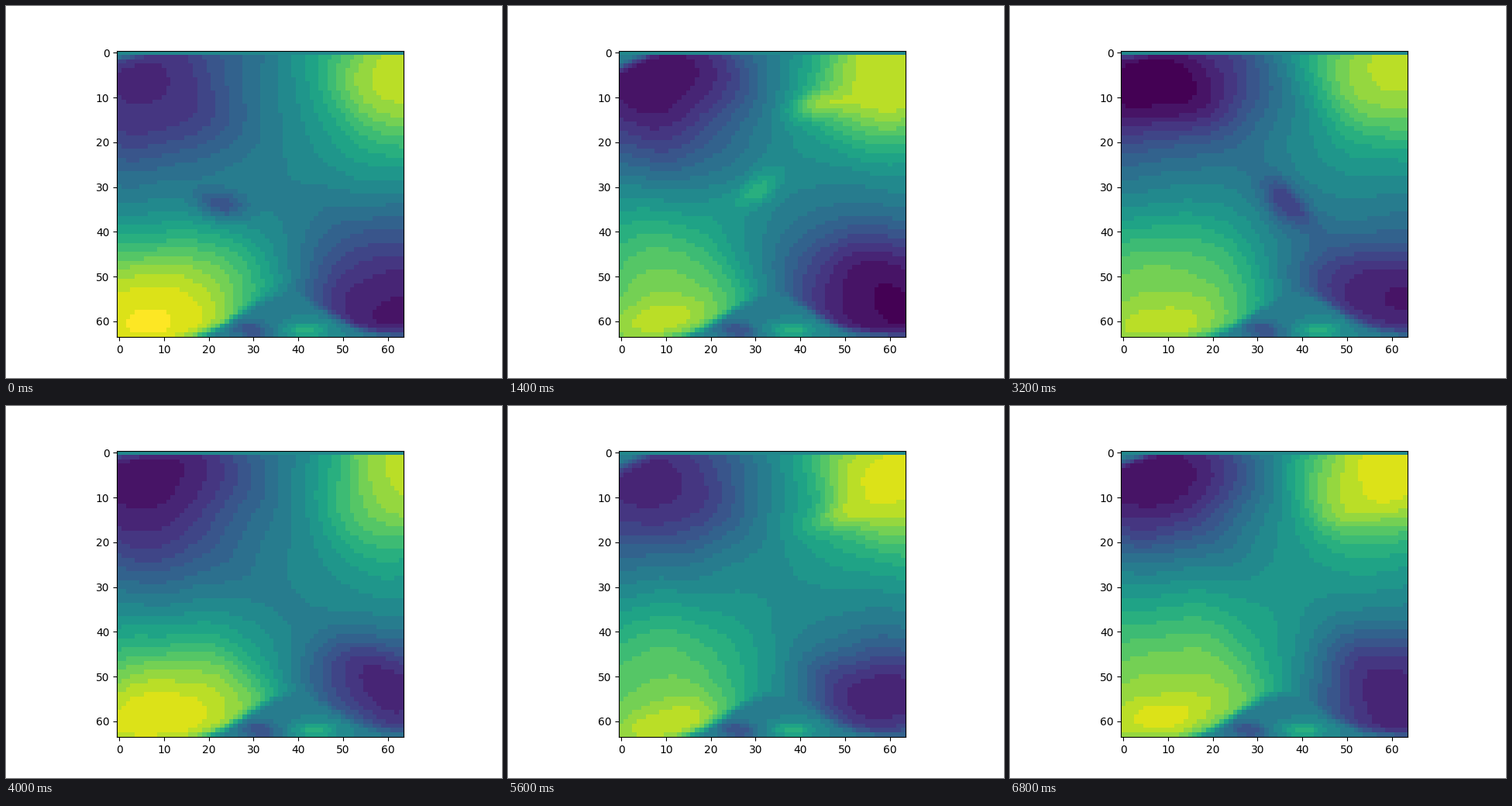
Animation of 640 by 480 pixels, one loop 7000 ms. Source, as a matplotlib script:

```python
import numpy as np
import matplotlib.pyplot as plt
from matplotlib.animation import FuncAnimation

N = 64
FRAMES = 35
STEP_MS = 200
WALL = 0.47

ROWS, COLS = np.mgrid[0:N, 0:N].astype(float)

# Brief wisps: frame of full strength, x, y, tilt in degrees, strength.
WISPS = [
    (0, 23, 35, 0, -.22),
    (7, 30, 29, -35, .18),
    (7, 43, 12, -15, .18),
    (16, 36, 34, 45, -.26),
    (30, 48, 14, -12, .22),
]

# Random plane waves that fray the contours.
rng = np.random.default_rng(4)
RIPPLES = [(rng.uniform(-.4, .4, 2), rng.uniform(.1, .5), rng.uniform(0, 2 * np.pi),
            rng.uniform(-.7, .7, 2)) for _ in range(6)]


def wave(frame, period, peak):
    return np.cos(2 * np.pi * (frame - peak) / period)


def eddy(x, y, cx, cy, rx, ry, strength, tilt=0):
    a = np.radians(tilt)
    dx, dy = x - cx, y - cy
    u = (dx * np.cos(a) + dy * np.sin(a)) / rx
    v = (dy * np.cos(a) - dx * np.sin(a)) / ry
    return strength / (1 + np.hypot(u, v) ** 3)


def step(d, width):
    return 0.5 + 0.5 * np.tanh(d / width)


def mix(a, b, share):
    return a + (b - a) * share


def ripple(frame):
    x, y = COLS.copy(), ROWS.copy()
    for (kx, ky), speed, phase, (px, py) in RIPPLES:
        swell = np.sin(kx * COLS + ky * ROWS + speed * frame + phase)
        x += px * swell
        y += py * swell
    return x, y


def corner_eddies(x, y, frame):
    tide = wave(frame, 24, 0)
    sway = wave(frame, 23, 11)
    tall = wave(frame, 19, 11)
    wide = wave(frame, 19, 16)
    slow = wave(frame, 45, 0)
    pulse = wave(frame, 8, 7)

    north_west = eddy(x, y, 7 - tide, 7, 22, 17 + 4 * tide, .06 * tide - .41)
    north_east = eddy(x, y, 60 - 3 * sway, 5, 17 + 1.5 * sway, 16 - 1.5 * sway,
                      .46 + .03 * sway)
    south_west = eddy(x, y, 10, 56 - 3 * tall, 25 + 4 * wide, 20 + 3 * tall,
                      .39 - .12 * tall, -10)
    south_east = eddy(x, y, 58, 55 + 2 * slow, 20 + 3 * pulse, 15 + 4 * slow,
                      -.42 - .04 * slow, 12)
    core = eddy(x, y, 9, 60, 13, 5, .10 + .07 * tall, -14)
    return north_west + north_east + south_west + south_east + core


def wisps(x, y, frame):
    total = 0
    for peak, cx, cy, tilt, strength in WISPS:
        age = frame - peak
        fade = np.exp(-(age / 3) ** 2)
        total = total + eddy(x, y, cx + .5 * age, cy, 6, 2.8, strength * fade, tilt)
    return total


def field(frame):
    slosh = wave(frame, 23, 18)
    x, y = ripple(frame)
    rest = .45 + .03 * wave(frame, 30, 0)
    flow = rest + corner_eddies(x, y, frame) + wisps(x, y, frame)

    # A calm mound slides along the floor with a dark and a light pocket inside.
    mid = 36 + 3 * slosh
    roof = 65 - COLS / 32 - 10 * np.exp(-((COLS - mid) / 13) ** 2)
    calm = (.43 + eddy(COLS, ROWS, mid - 7, 62, 4, 1.8, -.17, 10)
            + eddy(COLS, ROWS, mid + 5, 62, 4.5, 1.7, .19))
    flow = mix(flow, calm, step(ROWS - roof, 1.1))

    # The lid peels off a wedge in the upper left corner.
    wedge = (2 - 1.5 * slosh) * (1 - COLS / 7) - ROWS
    flow = mix(flow, .42, step(wedge, 1))
    flow[0] = WALL
    return flow


fig, ax = plt.subplots(figsize=(6.4, 4.8), dpi=100)
image = ax.imshow(field(0), cmap=plt.get_cmap("viridis", 20), vmin=0, vmax=1)


def draw(frame):
    image.set_data(field(frame))
    return [image]


anim = FuncAnimation(fig, draw, frames=FRAMES, interval=STEP_MS, repeat=True, repeat_delay=0)
plt.show()
```
